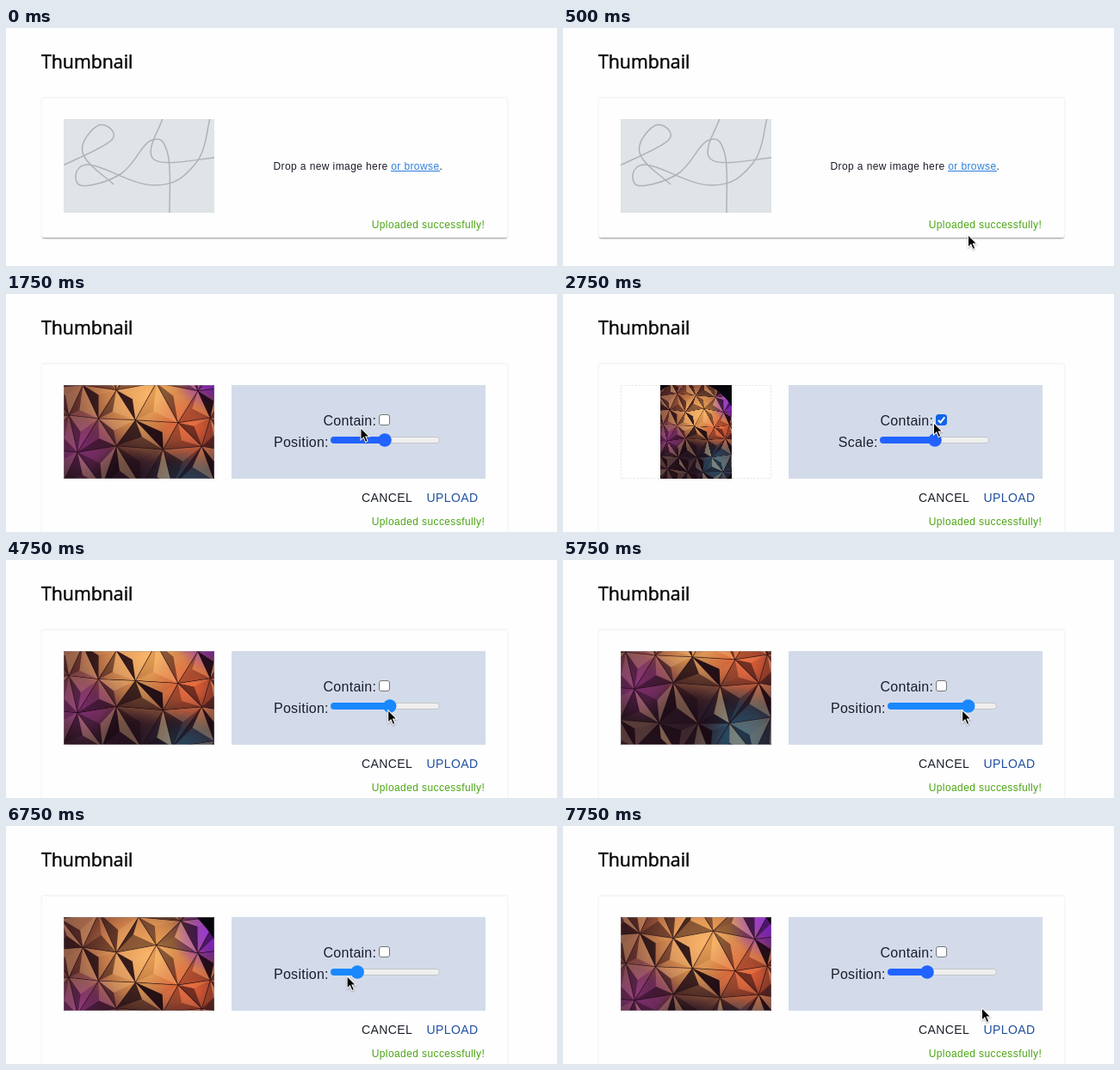
Write an HTML page with a canvas that moves like this. It is 640x277 px and loops after 8000 ms.

```html
<!DOCTYPE html>
<html lang="en">
<head>
<meta charset="utf-8">
<title>Thumbnail upload</title>
<style>
  html, body { margin: 0; width: 100%; height: 100%; overflow: hidden; background: #fdfefd; }
  canvas { display: block; width: 640px; height: 277px; }
</style>
</head>
<body>
<canvas id="stage"></canvas>
<script>
const W = 640, H = 277, LOOP = 8000, STEP = 250;
const THUMB = { x: 67, y: 106, w: 175, h: 109 };
const PHOTO = { w: 175, h: 232 };
const SANS = '"Liberation Sans", Arial, sans-serif';
const PAPER = '#fdfefd', INK = '#1c1e2a', BLUE = '#2263ff', ACTIVE = '#1988ff';

// Moments at which the form changes
const OPENED = 1000, LOADED = 1500, CHECKED = 2250, UNCHECKED = 3250;
const GRABBED = 4250, RELEASED = 7750;

const canvas = document.getElementById('stage');
const ctx = canvas.getContext('2d');
const ratio = Math.max(1, window.devicePixelRatio || 1);
canvas.width = W * ratio;
canvas.height = H * ratio;

// Eased value that leaves `from` at time `a` and settles on `to` at time `b`
function ease(t, a, b, from, to) {
  const u = Math.min(1, Math.max(0, (t - a) / (b - a)));
  return from + (to - from) * u * u * (3 - 2 * u);
}

// The knob is pulled right, swung back left, then settled
function knobAt(t) {
  if (t < 5600) return ease(t, 4450, 5600, 440, 474);
  if (t < 6700) return ease(t, 5600, 6700, 474, 408);
  return ease(t, 6700, 7500, 408, 423);
}

function cursorAt(t) {
  if (t >= RELEASED) return [486, 211];
  if (t >= GRABBED) return [knobAt(t) - (t - GRABBED) / 200, 174];
  if (t >= UNCHECKED) return [ease(t, UNCHECKED, GRABBED, 430, 440), ease(t, UNCHECKED, GRABBED, 149, 174)];
  if (t >= LOADED) return [ease(t, LOADED, CHECKED, 405, 430), ease(t, LOADED, CHECKED, 157, 149)];
  return [ease(t, 500, 1250, 470, 405), ease(t, 500, 1250, 240, 157)];
}

function seeded(seed) {
  return () => {
    seed = (seed * 1664525 + 1013904223) >>> 0;
    return seed / 4294967296;
  };
}

function polygon(g, points) {
  g.beginPath();
  points.forEach(([x, y]) => g.lineTo(x, y));
  g.closePath();
}

// Faceted globe lit in orange, violet and teal
function makePhoto() {
  const scale = 2 * ratio;
  const image = document.createElement('canvas');
  image.width = PHOTO.w * scale;
  image.height = PHOTO.h * scale;
  const g = image.getContext('2d');
  const random = seeded(23);
  const jitter = amount => (random() - 0.5) * amount;
  g.scale(scale, scale);
  g.fillStyle = '#08060d';
  g.fillRect(0, 0, PHOTO.w, PHOTO.h);

  g.beginPath();
  g.ellipse(70, 135, 128, 145, 0, 0, Math.PI * 2);
  g.clip();
  g.fillStyle = '#38202a';
  g.fillRect(0, 0, PHOTO.w, PHOTO.h);
  const glow = (x, y, r, rgb) => {
    const fill = g.createRadialGradient(x, y, 0, x, y, r);
    fill.addColorStop(0, `rgba(${rgb},0.95)`);
    fill.addColorStop(0.5, `rgba(${rgb},0.6)`);
    fill.addColorStop(1, `rgba(${rgb},0)`);
    g.fillStyle = fill;
    g.fillRect(0, 0, PHOTO.w, PHOTO.h);
  };
  glow(70, 55, 110, '170,84,56');
  glow(100, 72, 80, '255,178,92');
  glow(150, 110, 52, '238,98,54');
  glow(24, 132, 44, '142,52,128');
  glow(138, 195, 58, '42,98,128');
  glow(170, 46, 44, '146,36,236');
  glow(75, 178, 48, '38,20,34');

  const side = 44, rise = 37, cols = 7, rows = 8;
  const grid = Array.from({ length: rows }, (_, r) => Array.from({ length: cols }, (_, c) => [
    (c - 1.5 + (r % 2) / 2) * side + jitter(13),
    (r - 0.3) * rise + jitter(11)
  ]));

  const pyramid = corners => {
    const apex = [0, 1].map(n => corners.reduce((sum, p) => sum + p[n], 0) / 3 + jitter(10));
    corners.forEach((a, i) => {
      const b = corners[(i + 1) % 3];
      const tilt = Math.atan2((a[1] + b[1]) / 2 - apex[1], (a[0] + b[0]) / 2 - apex[0]);
      const light = Math.cos(tilt + 0.5) * 0.6 + jitter(0.7) - 0.1;
      polygon(g, [a, b, apex]);
      g.fillStyle = light > 0 ? `rgba(255,206,140,${light * 0.5})` : `rgba(24,8,18,${-light * 0.9})`;
      g.fill();
    });
    polygon(g, corners);
    g.lineWidth = 0.8;
    g.strokeStyle = 'rgba(30,10,18,0.5)';
    g.stroke();
  };
  for (let r = 0; r < rows - 1; r++) {
    for (let c = 0; c < cols - 1; c++) {
      const [a, b] = [grid[r][c], grid[r][c + 1]];
      const [d, e] = [grid[r + 1][c], grid[r + 1][c + 1]];
      if (r % 2) { pyramid([a, b, e]); pyramid([a, e, d]); }
      else { pyramid([a, b, d]); pyramid([b, e, d]); }
    }
  }
  return image;
}
const photo = makePhoto();

function text(label, x, y, size, color, spacing = 0, family = SANS) {
  ctx.font = `${size}px ${family}`;
  ctx.letterSpacing = `${spacing}px`;
  ctx.fillStyle = color;
  ctx.fillText(label, x, y);
}

function drawTitle() {
  text('Thumbnail', 41, 47, 21.3, '#080808', 0, '"Open Sans", "Noto Sans", sans-serif');
  ctx.strokeStyle = '#080808';
  ctx.lineWidth = 0.5;
  ctx.strokeText('Thumbnail', 41, 47);
}

function box(x, y, w, h, radius, fill, stroke) {
  ctx.beginPath();
  ctx.roundRect(x, y, w, h, radius);
  if (fill) { ctx.fillStyle = fill; ctx.fill(); }
  if (stroke) { ctx.lineWidth = 1; ctx.strokeStyle = stroke; ctx.stroke(); }
}

function smoothLine(points) {
  const at = i => points[Math.min(points.length - 1, Math.max(0, i))];
  ctx.beginPath();
  ctx.moveTo(...points[0]);
  for (let i = 0; i < points.length - 1; i++) {
    const [a, b, c, d] = [at(i - 1), at(i), at(i + 1), at(i + 2)];
    ctx.bezierCurveTo(
      b[0] + (c[0] - a[0]) / 5, b[1] + (c[1] - a[1]) / 5,
      c[0] - (d[0] - b[0]) / 5, c[1] - (d[1] - b[1]) / 5, c[0], c[1]);
  }
  ctx.stroke();
}

function drawPlaceholder() {
  ctx.fillStyle = '#dfe4e7';
  ctx.fillRect(THUMB.x, THUMB.y, THUMB.w, THUMB.h);
  ctx.strokeStyle = '#aeb3b7';
  ctx.lineWidth = 1.5;
  smoothLine([[66, 160], [123, 130], [108, 113], [89, 145], [125, 182]]);
  smoothLine([[237, 105], [220, 158], [172, 183], [95, 159], [86, 183], [133, 170],
    [168, 131], [188, 147], [190, 216]]);
  smoothLine([[243, 151], [172, 153], [182, 105]]);
}

function drawThumbnail(t, contain, position) {
  const { x, y, w, h } = THUMB;
  ctx.save();
  ctx.beginPath();
  ctx.rect(x, y, w, h);
  ctx.clip();
  if (t < LOADED) {
    drawPlaceholder();
  } else if (contain) {
    const width = h * PHOTO.w / PHOTO.h;
    ctx.setLineDash([2, 2]);
    box(x + 0.5, y + 0.5, w - 1, h - 1, 0, '#fff', '#e0e3e8');
    ctx.drawImage(photo, x + (w - width) / 2, y, width, h);
  } else {
    ctx.drawImage(photo, x, y - (PHOTO.h - h) * position, PHOTO.w, PHOTO.h);
    box(x + 0.5, y + 0.5, w - 1, h - 1, 0, null, 'rgba(150,140,150,0.4)');
  }
  ctx.restore();
}

function drawPanel(height) {
  ctx.save();
  ctx.shadowColor = 'rgba(0,0,0,0.42)';
  ctx.shadowBlur = 2 * ratio;
  ctx.shadowOffsetY = ratio;
  box(42, 81.5, 540, height, 2, PAPER);
  ctx.restore();
  box(41.5, 80.5, 541, height + 0.5, 2, null, '#f5f7f5');
}

function drawCheckbox(checked) {
  box(433.5, 140.5, 12, 12, 2.5, checked ? '#1064e8' : '#fff', checked ? '#1064e8' : '#767676');
  if (!checked) return;
  ctx.strokeStyle = '#fff';
  ctx.lineWidth = 2;
  ctx.beginPath();
  ctx.moveTo(436, 147);
  ctx.lineTo(438.5, 149.5);
  ctx.lineTo(443.3, 143.3);
  ctx.stroke();
}

function drawSlider(left, knob, color) {
  box(left + 0.5, 166.5, 126, 7, 3.5, '#efefef', '#c3c5c6');
  box(left, 166, knob - left, 8, 4, color);
  ctx.beginPath();
  ctx.arc(knob, 170, 7.8, 0, Math.PI * 2);
  ctx.fill();
}

function drawForm(t, contain, knob) {
  if (t >= LOADED) {
    ctx.fillStyle = '#d3dbea';
    ctx.fillRect(262, 106, 295, 109);
  }
  text('Contain:', 368.5, 153, 16, INK, 0.27);
  drawCheckbox(contain);
  if (contain) {
    text('Scale:', 319.7, 178, 16, INK, 0.27);
    drawSlider(368, 432, BLUE);
  } else {
    text('Position:', 311, 178, 16, INK, 0.27);
    drawSlider(377, knob, t >= GRABBED && t < RELEASED ? ACTIVE : BLUE);
  }
  text('CANCEL', 413, 242, 14, INK, 0.4);
  text('UPLOAD', 488.5, 242, 14, '#2050a0', 0.4);
}

function drawDropHint() {
  text('Drop a new image here ', 310.5, 165, 12, INK, 0.4);
  text('or browse', 447.2, 165, 12, '#2f7fdc', 0.4);
  ctx.fillRect(447, 166, 57, 1);
  text('.', 503.6, 165, 12, INK, 0.4);
}

function drawCursor(x, y) {
  ctx.save();
  ctx.translate(x, y);
  polygon(ctx, [[1, 2], [1, 14], [4, 11], [6.5, 17], [8, 16], [5.5, 10.5], [9.5, 10.5]]);
  ctx.strokeStyle = '#fff';
  ctx.lineWidth = 2;
  ctx.shadowColor = 'rgba(0,0,0,0.3)';
  ctx.shadowBlur = 2 * ratio;
  ctx.shadowOffsetY = ratio;
  ctx.stroke();
  ctx.shadowColor = 'transparent';
  ctx.fillStyle = '#000';
  ctx.fill();
  ctx.restore();
}

function draw(t) {
  const open = t >= OPENED;
  const contain = t >= CHECKED && t < UNCHECKED;
  const knob = knobAt(t);
  ctx.setTransform(ratio, 0, 0, ratio, 0, 0);
  ctx.fillStyle = PAPER;
  ctx.fillRect(0, 0, W, H);
  drawTitle();
  drawPanel(open ? 199 : 162.5);
  drawThumbnail(t, contain, (knob - 385) / 111);
  if (open) drawForm(t, contain, knob);
  else drawDropHint();
  text('Uploaded successfully!', 424.7, open ? 269 : 233, 12, '#4da414', 0.4);
  if (t >= 500) drawCursor(...cursorAt(t));
}

const start = performance.now();
function tick() {
  const elapsed = (performance.now() - start) % LOOP;
  draw(Math.floor(elapsed / STEP) * STEP);
  requestAnimationFrame(tick);
}
tick();
</script>
</body>
</html>
```
